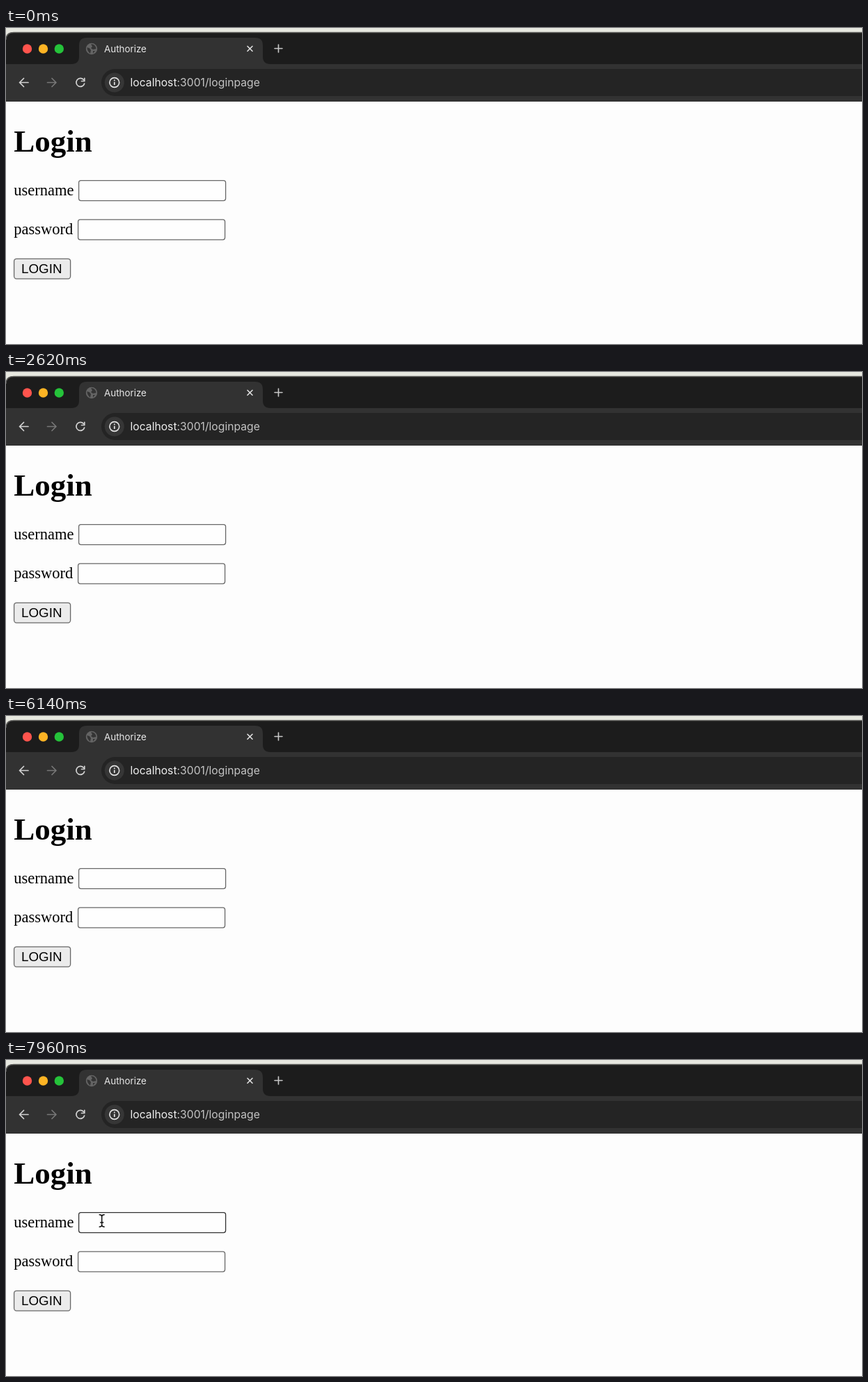
Animation of 1230 by 455 pixels, one loop 8 s. Source, as an HTML page:

```html
<!DOCTYPE html>
<html lang="en">
<head>
<meta charset="utf-8">
<title>Authorize</title>
<style>
  html, body { margin: 0; width: 100%; height: 100%; overflow: hidden; background: #fdfdfd; }
  svg { display: block; width: 1230px; height: 455px; }
  .ui { font-family: Inter, Roboto, sans-serif; }
  .page { font: 22.5px "Liberation Serif", "Times New Roman", serif; }
  .line { fill: none; stroke-linecap: round; stroke-linejoin: round; }
  .field { fill: #fff; fill-opacity: .6; stroke: #686868; stroke-width: 1.3; }
</style>
</head>
<body>
<svg viewBox="0 0 1230 455">
  <rect width="1230" height="455" fill="#fdfdfd"/>

  <!-- window frame and tab strip -->
  <rect width="1230" height="20" fill="#e7e8e0"/>
  <path d="M0 106V17Q0 6 11 6H1230V106Z" fill="#1c1c1c"/>
  <path d="M0 17Q0 6.5 11 6.5H1230" fill="none" stroke="#5b5b59" stroke-width="1.4"/>
  <circle cx="30.5" cy="30" r="6.7" fill="#ff544d"/>
  <circle cx="53.5" cy="30" r="6.7" fill="#fdb424"/>
  <circle cx="76.3" cy="30" r="6.7" fill="#25c33a"/>
  <path d="M0 106V52H94Q105 52 105 41V25Q105 14 116 14H358Q369 14 369 25V41Q369 52 380 52H1230V106Z" fill="#323232"/>
  <g transform="translate(123 30)">
    <circle r="8.2" fill="#646464"/>
    <path d="M-6.7-2L-3-1L-1 2L-2 6.7Q-6 4-6.7-2M-1-6.7L1-3.5L-1-1L2 1L6.5 0Q6-5 2-6.5ZM2 3L5 3L2 6.5Z" fill="#343434"/>
  </g>
  <text class="ui" x="141" y="34.5" font-size="13.4" fill="#e8e8e8">Authorize</text>
  <path class="line" d="M347 26.3l7 7m0-7l-7 7" stroke="#e2e2e2" stroke-width="1.6"/>
  <path class="line" d="M386 29.5h11m-5.500-5.500v11" stroke="#c9c9c9" stroke-width="1.6"/>

  <!-- toolbar -->
  <path d="M1230 59H156.500a19.500 19.500 0 0 0 0 39H1230Z" fill="#242424"/>
  <circle cx="155.800" cy="78.500" r="14" fill="#363636"/>
  <path class="line" d="M32 78.500H19.500m6-6l-6 6l6 6" stroke="#d2d2d2" stroke-width="1.700"/>
  <path class="line" d="M59.500 78.500H72m-6-6l6 6l-6 6" stroke="#777" stroke-width="1.700"/>
  <path class="line" d="M111.500 74.500A6 6 0 1 0 112.700 80M112.800 72.300V76.500H108.500" stroke="#d2d2d2" stroke-width="1.700"/>
  <circle cx="155.800" cy="78.500" r="6.900" fill="none" stroke="#e4e4e4" stroke-width="1.600"/>
  <path d="M155.800 77.700v4.300M155.800 74.600v1.700" stroke="#e4e4e4" stroke-width="1.700"/>
  <text class="ui" x="178.500" y="84" font-size="15.700" fill="#c4c4c4"><tspan fill="#eee">localhost</tspan>:3001/loginpage</text>

  <!-- login form -->
  <g class="page">
    <text x="11.300" y="178" font-size="45" font-weight="700">Login</text>
    <text x="11.300" y="241">username</text>
    <text x="11.300" y="297">password</text>
  </g>
  <rect id="user" class="field" x="104.600" y="219.600" width="211" height="29" rx="3"/>
  <rect class="field" x="103.600" y="275.800" width="211" height="29" rx="3"/>
  <rect x="11.600" y="332.300" width="81" height="28.800" rx="3.500" fill="#ebebeb" stroke="#686868" stroke-width="1.300"/>
  <text x="22" y="353.300" font-family="Liberation Sans, Arial, sans-serif" font-size="18.800">LOGIN</text>

  <g id="arrow" display="none">
    <path d="M0 0V17L4 13.300L6.700 19.500L9.500 18.300L6.800 12.300H12.300Z" fill="#000" stroke="#fff" stroke-width="1.300"/>
  </g>
  <g id="beam" class="line" display="none">
    <path id="bar" d="M-3.500-8.700Q0-8.700 0-6V6Q0 8.700-3.500 8.700M3.500-8.700Q0-8.700 0-6V6Q0 8.700 3.500 8.700M-2 2.500H2" stroke="#fff" stroke-width="3.200"/>
    <use href="#bar" style="stroke:#111"/>
    <path d="M-3.500-8.700Q0-8.700 0-6V6Q0 8.700-3.500 8.700M3.500-8.700Q0-8.700 0-6V6Q0 8.700 3.500 8.700M-2 2.500H2" stroke="#111" stroke-width="1.500"/>
  </g>
</svg>
<script>
  const LOOP = 8000, ENTER = 7000, STEP = 40;
  const el = id => document.getElementById(id);
  const arrow = el("arrow"), beam = el("beam"), user = el("user");

  // pointer keys: time, x, y
  const path = [
    [7000, 206, 430], [7120, 177, 350], [7240, 150, 262],
    [7360, 139, 223.5], [7520, 138, 228], [7720, 137.700, 231.500], [8000, 137.700, 231.500]
  ];

  function pointAt(t) {
    const i = Math.max(1, path.findIndex(k => k[0] > t));
    const [a, b] = [path[i - 1], path[i]];
    const p = (t - a[0]) / (b[0] - a[0]);
    return [1, 2].map(n => a[n] + (b[n] - a[n]) * p);
  }

  function place(node, visible, x, y) {
    node.setAttribute("display", visible ? "inline" : "none");
    if (visible) node.setAttribute("transform", `translate(${x} ${y})`);
  }

  function draw(time) {
    const t = Math.floor(time % LOOP / STEP) * STEP;
    const shown = t >= ENTER;
    const [x, y] = shown ? pointAt(t) : [0, 0];
    const inField = shown && x > 104 && y > 219 && y < 249;
    place(arrow, shown && !inField, x, y);
    place(beam, inField, x, y);
    user.style.stroke = inField ? "#333" : "";
  }

  const start = performance.now();
  function tick() {
    draw(performance.now() - start);
    requestAnimationFrame(tick);
  }
  tick();
</script>
</body>
</html>
```
